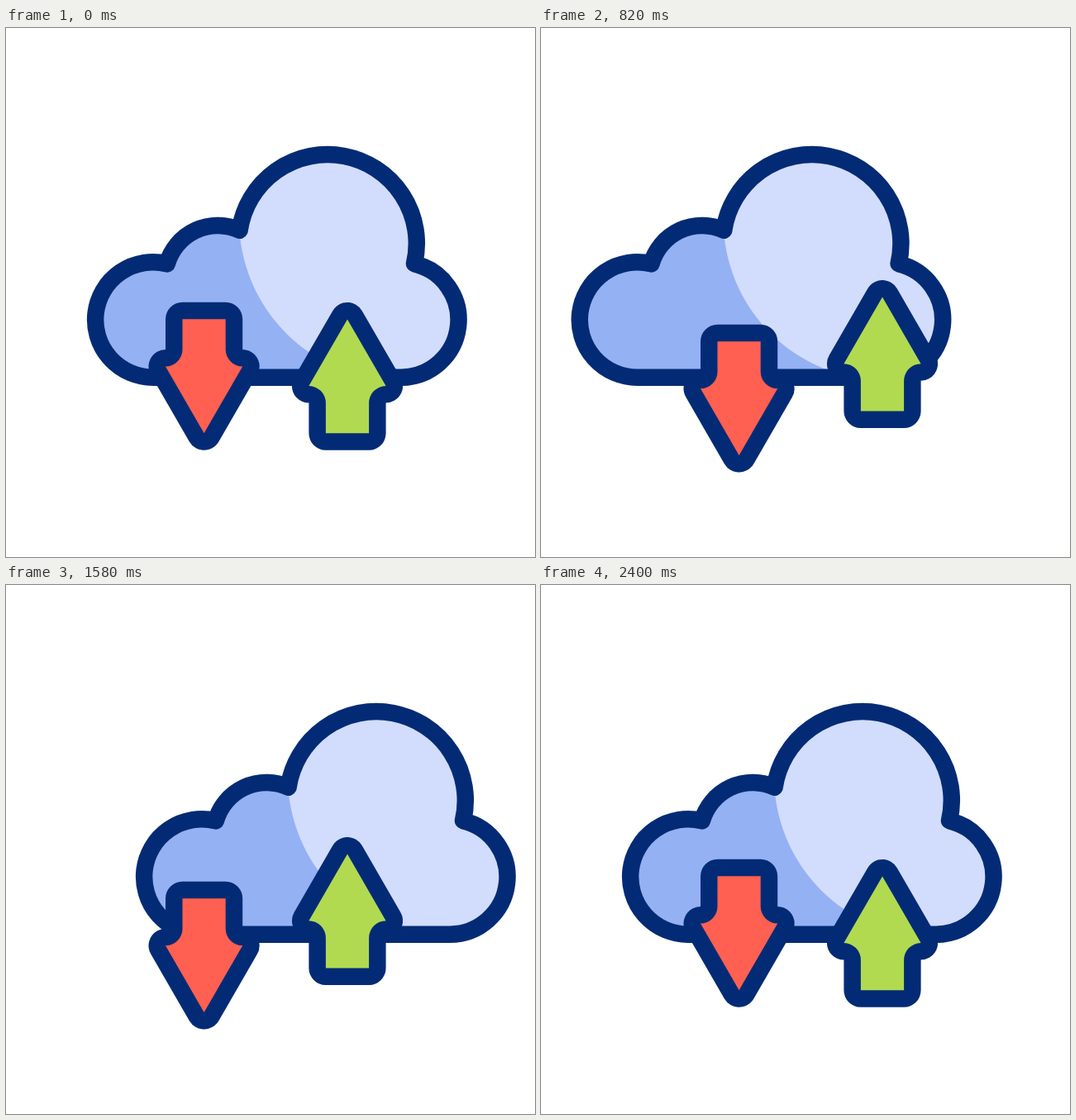
Animation of 640x640 px, one loop 2420 ms. Source, as an HTML page:

```html
<!DOCTYPE html>
<html lang="en">
<head>
<meta charset="utf-8">
<title>Cloud transfer</title>
<style>
  html, body { margin: 0; width: 100%; height: 100%; overflow: hidden; background: #fff; }
  svg { display: block; width: 100%; height: 100%; }
  .outline { fill: none; stroke: #032b75; stroke-width: 20.5; stroke-linejoin: round; }
  .halo { stroke-width: 41; }
</style>
</head>
<body>
<svg viewBox="0 0 640 640">
  <defs>
    <path id="cloudShape" d="M178 422.7A69.7 69.7 0 1 1 194.8 285.4A63.7 63.7 0 0 1 282.6 244.8A107.7 107.7 0 1 1 494 285.2A69.7 69.7 0 0 1 478 422.7Z"/>
    <path id="arrowShape" d="M213.5 352.3H265.7V389A20.5 20.5 0 0 0 286.2 409.5L239.6 490.2L193 409.5A20.5 20.5 0 0 0 213.5 389Z"/>
    <clipPath id="cloudClip"><use href="#cloudShape"/></clipPath>
  </defs>
  <g id="cloud">
    <use href="#cloudShape" fill="#94b1f3"/>
    <g clip-path="url(#cloudClip)"><circle cx="476" cy="232" r="194" fill="#d2dcfd"/></g>
    <use href="#cloudShape" class="outline"/>
  </g>
  <g class="arrow">
    <use href="#arrowShape" class="outline halo"/>
    <use href="#arrowShape" fill="#ff6051"/>
  </g>
  <g transform="rotate(180 326.3 421.3)">
    <g class="arrow">
      <use href="#arrowShape" class="outline halo"/>
      <use href="#arrowShape" fill="#b1da51"/>
    </g>
  </g>
</svg>
<script>
  const LOOP = 2420, MOTION = 2400;
  const cloud = document.getElementById('cloud');
  const arrows = document.querySelectorAll('.arrow');

  // Eases evenly spaced key values over the whole motion.
  function keyed(values, time) {
    const pos = time / MOTION * (values.length - 1);
    const i = Math.min(Math.floor(pos), values.length - 2);
    const u = pos - i;
    return values[i] + (values[i + 1] - values[i]) * u * u * (3 - 2 * u);
  }

  function draw(now) {
    const time = Math.min(now % LOOP, MOTION);
    const shift = keyed([0, -61.6, 59.2, 0], time);
    const drop = keyed([0, 38.6, 0, 38.6, 0], time);
    cloud.setAttribute('transform', `translate(${shift} 0)`);
    arrows.forEach(arrow => arrow.setAttribute('transform', `translate(0 ${drop})`));
  }

  let start;
  function tick(now) {
    start ??= now;
    draw(now - start);
    requestAnimationFrame(tick);
  }
  requestAnimationFrame(tick);
</script>
</body>
</html>
```
